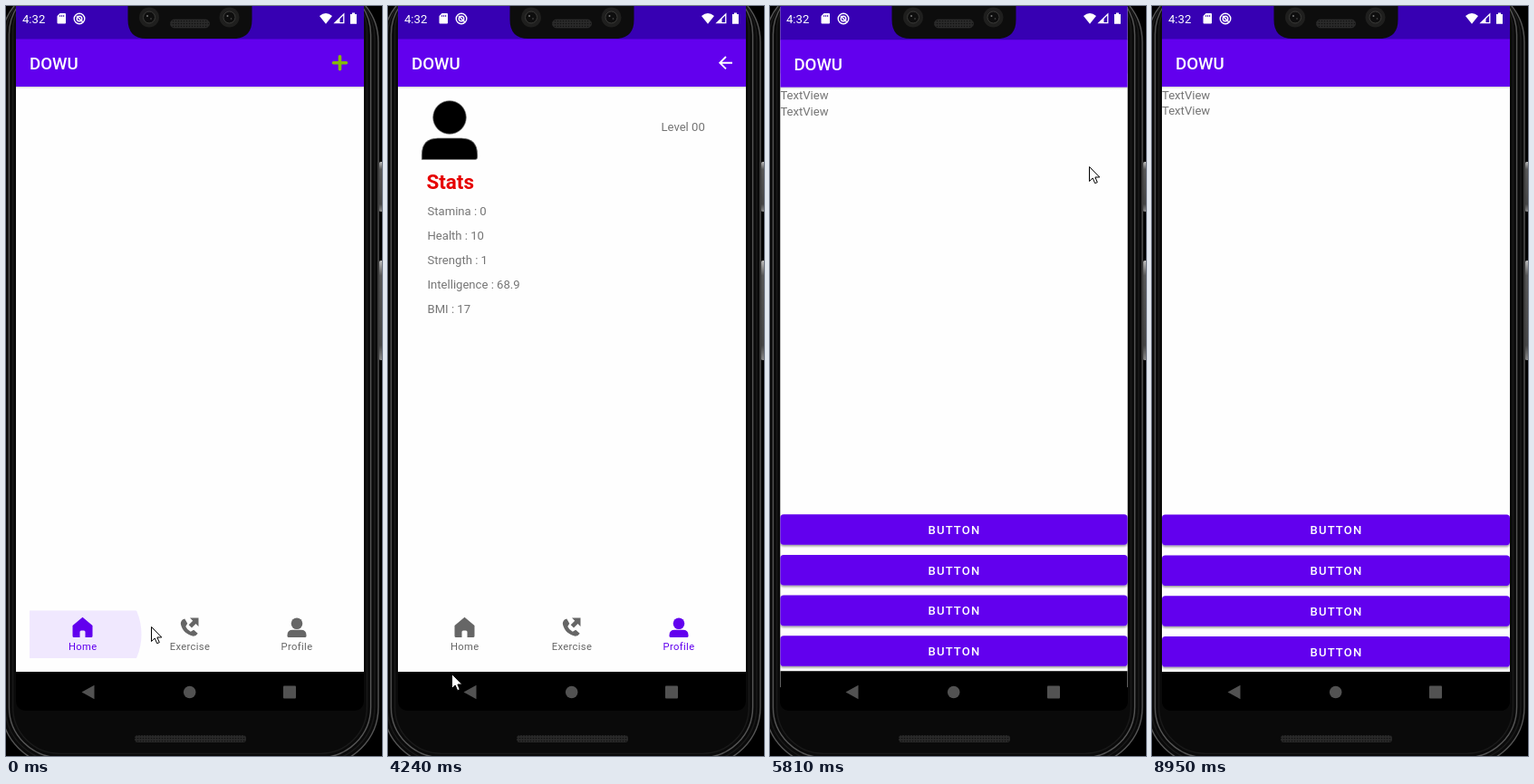
An HTML page that plays this animation: 415 px wide and 828 px high, repeating every 9.48 s.

```html
<!DOCTYPE html>
<html lang="en">
<head>
<meta charset="utf-8">
<title>Fitness app demo</title>
<style>
  html, body { margin: 0; width: 100%; height: 100%; overflow: hidden; background: #000; }
  svg { display: block; width: 415px; height: 828px; font-family: Roboto, sans-serif; }
  .title { font-size: 18.7px; font-weight: 500; fill: #fff; }
  .body { font-size: 13.1px; fill: #757575; }
  .btn { font-size: 13.1px; font-weight: 500; letter-spacing: .089em; fill: #fff; text-anchor: middle; }
  .tab { fill: #666; }
  .tab text { font-size: 11.2px; letter-spacing: .033em; text-anchor: middle; }
  .tab.on { fill: #6200ee; }
</style>
</head>
<body>
<svg viewBox="0 0 415 828">
  <defs>
    <clipPath id="screen"><path d="M11-4H395V766Q395 778 383 778H23Q11 778 11 766Z"/></clipPath>
    <clipPath id="tabs"><rect x="26" y="667.5" width="354" height="52.5"/></clipPath>
    <clipPath id="lastBtn"><rect x="11" y="696" width="384" height="33.6" rx="3.7"/></clipPath>
    <filter id="raise" x="-5%" y="-20%" width="110%" height="160%">
      <feDropShadow dx="0" dy="1.6" stdDeviation="1.3" flood-opacity=".42"/>
    </filter>
    <linearGradient id="key" x1="0" x2="0" y1="0" y2="1">
      <stop offset="0" stop-color="#bbb"/><stop offset=".15" stop-color="#555"/>
      <stop offset=".85" stop-color="#444"/><stop offset="1" stop-color="#888"/>
    </linearGradient>
    <linearGradient id="fall" x1="0" x2="0" y1="0" y2="1">
      <stop offset="0" stop-opacity=".16"/><stop offset="1" stop-opacity="0"/>
    </linearGradient>
    <pattern id="mesh" width="3" height="3" patternUnits="userSpaceOnUse">
      <rect width="3" height="3" fill="#292929"/><circle cx="1.5" cy="1.5" r=".8" fill="#111"/>
    </pattern>
    <g id="appbar">
      <rect x="11" y="36" width="384" height="53" fill="#6200ee"/>
      <rect x="11" y="89" width="384" height="2.5" fill="url(#fall)"/>
      <rect x="11" y="-4" width="384" height="40.5" fill="#3700b3"/>
      <text class="title" x="26" y="70">DOWU</text>
    </g>
  </defs>

  <g id="shell"></g>

  <g clip-path="url(#screen)">
    <rect x="11" y="-4" width="384" height="782" fill="#000"/>
    <g id="main">
      <rect x="11" y="0" width="384" height="735" fill="#fefefe"/>
      <use href="#appbar"/>
      <g id="home">
        <path d="M361.5 62.7H375.5M368.5 55.7V69.7" stroke="#84b80c" stroke-width="3.6" stroke-linecap="round"/>
        <circle id="plusRipple" cx="368" cy="63" r="22" fill="#fff" opacity=".22"/>
      </g>
      <g id="exercise">
        <text x="29" y="131" font-size="16.8" fill="#999">Choose Exercise</text>
        <path d="M29 138.3H376" stroke="#888"/>
        <rect x="26" y="338" width="354" height="33.6" rx="3.7" fill="#6200ee" filter="url(#raise)"/>
        <text class="btn" x="203.5" y="359.8">START EXERCISE</text>
      </g>
      <g id="profile">
        <path d="M380 62.7H366.5M373 56L366.3 62.7L373 69.4" fill="none" stroke="#fff" stroke-width="1.9"/>
        <g stroke="#777" stroke-width=".7">
          <circle cx="68" cy="123" r="18.3"/>
          <path d="M37.3 169.5V164Q37.3 146 55 146H81Q98.7 146 98.7 164V167Q98.7 169.5 96 169.5Z"/>
        </g>
        <text class="body" x="301.5" y="138">Level 00</text>
        <text x="42.5" y="202" font-size="22.4" font-weight="700" fill="#e60000">Stats</text>
        <g id="stats"></g>
      </g>
      <g clip-path="url(#tabs)"><circle id="ripple" cy="693.7"/></g>
      <g class="tab">
        <path d="M84.5 674.8L95.5 684V695.5Q95.5 697 94 697H87.5V691Q87.5 689.5 86 689.5H83Q81.5 689.5 81.5 691V697H75Q73.5 697 73.5 695.5V684Z"/>
        <text x="84.7" y="710.7">Home</text>
      </g>
      <g class="tab">
        <path d="M195.2 677.2Q192.2 679.6 193 683C194.6 689.5 199.5 694 206 695.6Q209.6 696 211.7 692.7L207.2 688.7L203.8 690.8Q199.8 688.7 198.3 685L200.3 681.8L197.3 676.6Z"/>
        <path d="M203 675.5H212.500V685L209.500 682L205 686.500L201.700 683.200L206.200 678.700Z"/>
        <text x="203" y="710.7">Exercise</text>
      </g>
      <g class="tab">
        <circle cx="321" cy="681.7" r="6.3"/>
        <path d="M310.5 695.5V694.5Q310.5 688.8 316.5 688.8H325.5Q331.5 688.8 331.5 694.5V695.5Q331.5 697 330 697H312Q310.5 697 310.5 695.5Z"/>
        <text x="321" y="710.7">Profile</text>
      </g>
      <rect id="dim" x="11" y="-4" width="384" height="739" opacity=".11"/>
    </g>
    <g id="second">
      <rect x="11" y="-4" width="384" height="782" fill="#000"/>
      <rect x="11" y="0" width="384" height="735" fill="#fefefe"/>
      <use href="#appbar"/>
      <text class="body" x="11" y="102.7">TextView</text>
      <text class="body" x="11" y="120.2">TextView</text>
      <g id="buttons"></g>
      <g clip-path="url(#lastBtn)"><circle id="press" cx="195" cy="718" fill="#fff"/></g>
    </g>

    <g fill="#fff">
      <text x="18" y="19" font-size="13.1">4:32</text>
      <path d="M59.5 8H65Q66 8 66 9V18.5Q66 19.5 65 19.5H57.5Q56.5 19.5 56.5 18.5V11Z"/>
      <path d="M59.7 10V12M61.7 10V12M63.7 10V12" stroke="#3700b3" stroke-width=".9"/>
      <g fill="none" stroke="#fff" stroke-width="1.4">
        <circle cx="81" cy="14" r="5.8"/><circle cx="81" cy="14" r="2.8"/><path d="M78 11L85 18"/>
      </g>
      <path d="M346 11Q353 5 360 11L353 19.7Z"/>
      <path d="M363 18.7H372.8V9Z" fill="none" stroke="#fff" stroke-width="1.3"/>
      <path d="M368.5 13.5L363 19H368.5Z"/>
      <path d="M382 7.5H385V9H387V19.7H380V9H382Z"/>
    </g>
    <g fill="#525252">
      <path d="M83.5 757.5L97.5 749.8V765.2Z"/>
      <circle cx="202.7" cy="757.5" r="6.8"/>
      <rect x="306" y="750.5" width="14" height="14" rx="1"/>
    </g>
  </g>

  <path d="M134.5-4V15Q134.5 36 155 36H251Q271.500 36 271.500 15V-4Z" fill="#0d0d0d"/>
  <g id="cams"></g>
  <rect x="181.5" y="15" width="43" height="9" rx="4.5" fill="url(#mesh)" stroke="#333" stroke-width=".6"/>
  <rect x="142" y="805" width="123" height="8" rx="3.5" fill="url(#mesh)"/>

  <path id="cursor" d="M.5.5V16.5L4.200 13L6.700 18.700L9.300 17.600L6.900 12H11.800Z" fill="#fff" stroke="#000"/>
</svg>
<script>
const LOOP = 9480, STEP = 120;
const $ = id => document.getElementById(id);
const show = (id, on) => { $(id).style.display = on ? '' : 'none'; };
const set = (id, attrs) => { for (const k in attrs) $(id).setAttribute(k, attrs[k]); };
const repeat = (n, f) => Array.from({ length: n }, (_, i) => f(i)).join('');
const stepped = ms => Math.floor(ms / STEP) * STEP;

// nested rims, every other one catching the light
$('shell').innerHTML = repeat(4, i => {
  const half = 208 - 4.2 * i;
  return `<rect x="${203 - half}" y="-24" width="${2 * half}" height="${630 + half + 24}" rx="${half - 144}"
    fill="#0a0a0a" stroke="${i % 2 ? '#1a1a1a' : '#555'}" stroke-width="1.4"/>`;
}) + repeat(2, i =>
  `<rect x="412" y="${172 + 109 * i}" width="4" height="${55 + 55 * i}" rx="1.5" fill="url(#key)"/>`);

$('cams').innerHTML = repeat(2, i => `<g transform="translate(${158 + 88.5 * i} 12.5)">
  <circle r="11" fill="#1f1f1e"/><circle r="6.5" fill="#0e0e0e" stroke="#3a3a38"/>
  <circle cx="-2" cy="-1.5" r="1" fill="#777"/><circle cx="2" cy="1.5" r=".8" fill="#555"/></g>`);

const stats = ['Stamina : 0', 'Health : 10', 'Strength : 1', 'Intelligence : 68.9', 'BMI : 17'];
$('stats').innerHTML = repeat(stats.length, i =>
  `<text class="body" x="43.5" y="${231 + 27 * i}">${stats[i]}</text>`);

$('buttons').innerHTML = repeat(4, i => `<g transform="translate(0 ${561.6 + 44.8 * i})">
  <rect x="11" width="384" height="33.6" rx="3.7" fill="#6200ee" filter="url(#raise)"/>
  <text class="btn" x="203.5" y="21.7">BUTTON</text></g>`);

// pointer stops; "via" bends the way there
const start = [160, 685];
const moves = [
  { end: 390, steps: 3, to: [197, 694] },
  { end: 2190, steps: 6, to: [328, 708], via: [230, 655] },
  { end: 4240, steps: 5, to: [70, 737], via: [230, 186] },
  { end: 4630, steps: 3, to: [85, 690], via: [50, 600] },
  { end: 5020, steps: 2, to: [348, 70] },
  { end: 5140, steps: 1, to: [361, 66] },
  { end: 6170, steps: 4, to: [326, 511] },
  { end: 6680, steps: 4, to: [189, 719] },
  { end: 7440, steps: 4, to: [80, 750] },
  { end: 7930, steps: 3, to: [99, 734] },
  { end: 8080, steps: 1, to: [142, 586] },
  { end: 8830, steps: 6, to: [325, 679], via: [450, -62] }
];

function pointer(t) {
  let at = start;
  for (const { end, steps, to, via } of moves) {
    const k = Math.min(1, Math.floor((t - end) / STEP + steps) / steps);
    if (k <= 0) break;
    const from = at;
    at = to.map((b, i) => {
      const a = from[i], c = via ? via[i] : (a + b) / 2;
      return (1 - k) ** 2 * a + 2 * k * (1 - k) * c + k * k * b;
    });
  }
  return at;
}

const pages = ['home', 'exercise', 'profile'];
const tabs = document.querySelectorAll('.tab');
const taps = [[1170, 1], [2870, 2], [4770, 0], [LOOP - 151, 0]];

// grows while held, then pales and vanishes
function drawRipple(t) {
  const since = tap => (t - tap[0] + LOOP) % LOOP;
  const tap = taps.find(p => since(p) < 250);
  show('ripple', tap);
  if (!tap) return;
  const age = since(tap);
  set('ripple', {
    cx: 84.5 + 118.5 * tap[1],
    r: Math.min(65, 58 + age * .05),
    fill: age > 150 ? '#f0e8fe' : '#d6d6d6'
  });
}

const zoom = s => `translate(203 387) scale(${s}) translate(-203 -387)`;

// the new window settles to full size while the old one swells behind it
function drawWindows(t) {
  const age = stepped(t - 5450);
  const open = age >= 0;
  const rest = age < 480 ? Math.exp(-age / 97) : 0;
  show('second', open);
  show('dim', open);
  set('main', { transform: zoom(open ? 1.05 - .035 * rest : 1) });
  set('second', { transform: zoom(1 - .09 * rest) });
}

function drawPress(t) {
  const age = stepped(t - 6930);
  set('press', { r: Math.max(0, 80 + age), opacity: age < 0 ? 0 : Math.max(0, .22 - age / 1600) });
}

function draw(t) {
  const page = t < 1320 || t >= 4780 ? 0 : t < 2870 ? 1 : 2;
  pages.forEach((id, i) => {
    show(id, i === page);
    tabs[i].classList.toggle('on', i === page);
  });
  show('plusRipple', t >= 5140);
  drawRipple(t);
  drawWindows(t);
  drawPress(t);
  show('cursor', t < 8950);
  set('cursor', { transform: `translate(${pointer(t).map(Math.round)})` });
}

const born = performance.now();
function tick() {
  draw((performance.now() - born) % LOOP);
  requestAnimationFrame(tick);
}
tick();
</script>
</body>
</html>
```
